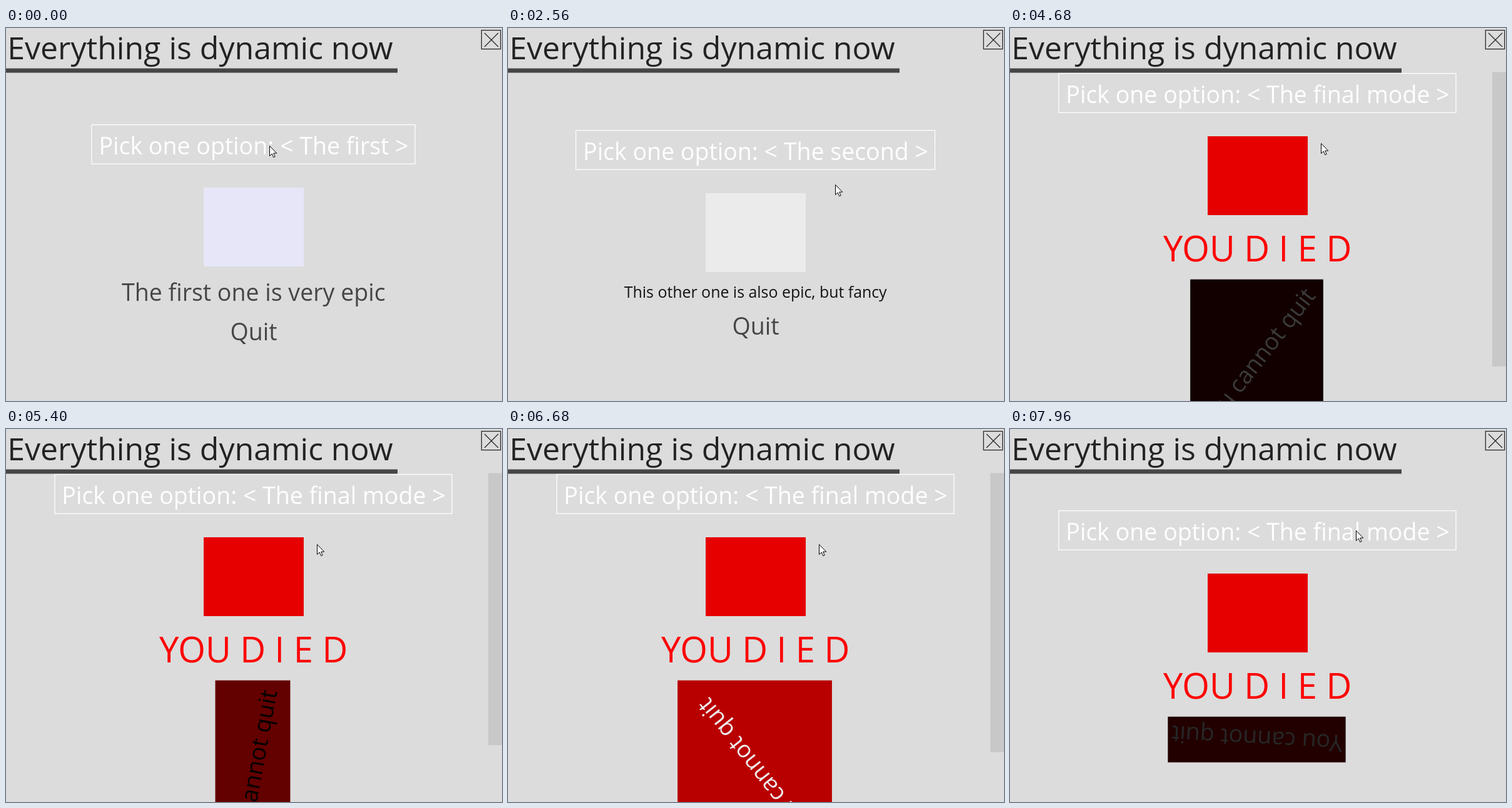
An HTML page for the animation above (8000 ms loop, 793x596 px).

```html
<!DOCTYPE html>
<html lang="en">
<head>
<meta charset="utf-8">
<title>Dynamic menu</title>
<style>
  html, body { margin: 0; width: 100%; height: 100%; overflow: hidden; background: #dcdcdc; }
  svg { display: block; position: absolute; left: 0; top: 0; }
  text { font-family: "Open Sans", "Noto Sans", sans-serif; font-size: 37.5px; white-space: pre; }
  .mid { text-anchor: middle; }
</style>
</head>
<body>
<svg width="793" height="596" viewBox="0 0 793 596">
  <rect y="64.5" width="626" height="7" fill="#464646"/>
  <text x="2.2" y="50" style="font-size:49.95px" fill="#232323">Everything is dynamic now</text>
  <g fill="none" stroke="#282828" stroke-width="1.3">
    <rect x="760.3" y="3.6" width="30.4" height="30"/>
    <path d="M765 8L787 30M787 8L765 30"/>
  </g>
  <g id="menu">
    <rect id="frame" y=".6" height="62.6" fill="none" stroke="#fff" stroke-width="1.25"/>
    <text id="option" class="mid" x="396" y="47.5" fill="#fff"></text>
    <rect id="logo" x="316" y="101" width="160" height="126"/>
    <text id="label" class="mid" x="395.7"></text>
    <g id="quit">
      <rect id="quitBox"/>
      <text id="quitText" class="mid" y="14.5"></text>
    </g>
  </g>
  <rect id="thumb" x="771" y="70.5" width="22" fill="#c8c8c8"/>
  <path id="mouse" d="M.5 .5V16.5L4.2 13L6.8 18.7L9.2 17.6L6.7 12.1H11.8Z" fill="#fff" stroke="#000"/>
</svg>
<script>
const LOOP = 8000, STEP = 40;
const LINE = 51, LINE_EM = 1.36, ASCENT_EM = 1.069;  // text line heights
const VIEW_TOP = 72, VIEW = 525, CENTER = 205;       // visible menu area
const LABEL_TOP = 241.5, GAP = 12;

const modes = [
  { from: 0, name: 'The first', label: 'The first one is very epic',
    size: 37.5, color: '#464646', logo: '#e6e6f8' },
  { from: 1400, name: 'The second', label: 'This other one is also epic, but fancy',
    size: 24.9, color: '#141414', logo: '#ebebeb' },
  { from: 3720, name: 'The final mode', label: 'YOU D I E D',
    size: 56, color: '#ff0000', logo: '#e60000', trap: true }
];

// Mouse stops: leave at one time, arrive at the next.
const stops = [
  { at: 280, x: 421, y: 188 }, { at: 840, x: 627, y: 178 },
  { at: 1400, x: 627, y: 178 }, { at: 2500, x: 518, y: 252 },
  { at: 3000, x: 656, y: 197 }, { at: 3720, x: 656, y: 197 },
  { at: 4480, x: 497, y: 184 }, { at: 7200, x: 497, y: 184 },
  { at: 7960, x: 553, y: 162 }
];

const $ = id => document.getElementById(id);
const set = (id, attrs) => {
  for (const k in attrs) $(id).setAttribute(k, attrs[k]);
};
const clamp = v => Math.min(1, Math.max(0, v));
const smooth = k => k * k * (3 - 2 * k);
const mix = (a, b, k) => Math.round(a + (b - a) * k);

function drawMouse(t) {
  const i = Math.max(1, stops.findIndex(s => t <= s.at));
  const a = stops[i - 1], b = stops[i];
  const k = smooth(clamp((t - a.at) / (b.at - a.at)));
  set('mouse', { transform: `translate(${mix(a.x, b.x, k)} ${mix(a.y, b.y, k)})` });
}

// One phase drives the button's padding, colours and angle; returns its height.
function drawQuit(m, t) {
  const p = m.trap ? Math.PI + .0076 * (t - m.from) : 0;
  const wave = 1 + Math.sin(p), angle = 5 * p, rad = angle * Math.PI / 180;
  const c = Math.abs(Math.cos(rad)), s = Math.abs(Math.sin(rad));
  const pad = m.trap ? 24.8 * wave : 0;
  const w = 275 * c + LINE * s + pad, h = 275 * s + LINE * c + pad;
  const gray = m.trap ? Math.floor(127 * (1 + Math.cos(p))) : 70;
  const y = LABEL_TOP + LINE_EM * m.size + GAP + h / 2;
  set('quit', { transform: `translate(${m.trap ? 394.5 : 396} ${y})` });
  set('quitBox', {
    x: -w / 2, y: -h / 2, width: w, height: h,
    fill: m.trap ? `rgb(${Math.floor(125 * wave)},0,0)` : 'none'
  });
  set('quitText', { transform: `rotate(${-angle})`, fill: `rgb(${gray},${gray},${gray})` });
  return h;
}

let shown = null;
function showMode(m) {
  if (m === shown) return;
  shown = m;
  $('option').textContent = `Pick one option: < ${m.name} >`;
  $('label').textContent = m.label;
  $('label').style.fontSize = m.size + 'px';
  $('quitText').textContent = m.trap ? 'You cannot quit' : 'Quit';
  set('label', { y: LABEL_TOP + ASCENT_EM * m.size, fill: m.color });
  set('logo', { fill: m.logo });
  const w = Math.round($('option').getComputedTextLength()) + 22;
  set('frame', { x: 395.5 - w / 2, width: w });
}

function render(t) {
  const m = modes.filter(o => o.from <= t).pop();
  showMode(m);
  const h = drawQuit(m, t);
  const top = Math.round(CENTER - (h + LINE_EM * m.size) / 2);
  const extra = Math.max(0, 2 * (VIEW_TOP - top) - 1);
  set('menu', { transform: `translate(0 ${Math.max(VIEW_TOP, top)})` });
  set('thumb', { height: extra ? VIEW * VIEW / (VIEW + extra) : 0 });
  drawMouse(t);
}

const start = performance.now();
function tick() {
  const t = (performance.now() - start) % LOOP;
  render(Math.floor(t / STEP) * STEP);
  requestAnimationFrame(tick);
}
tick();
</script>
</body>
</html>
```
